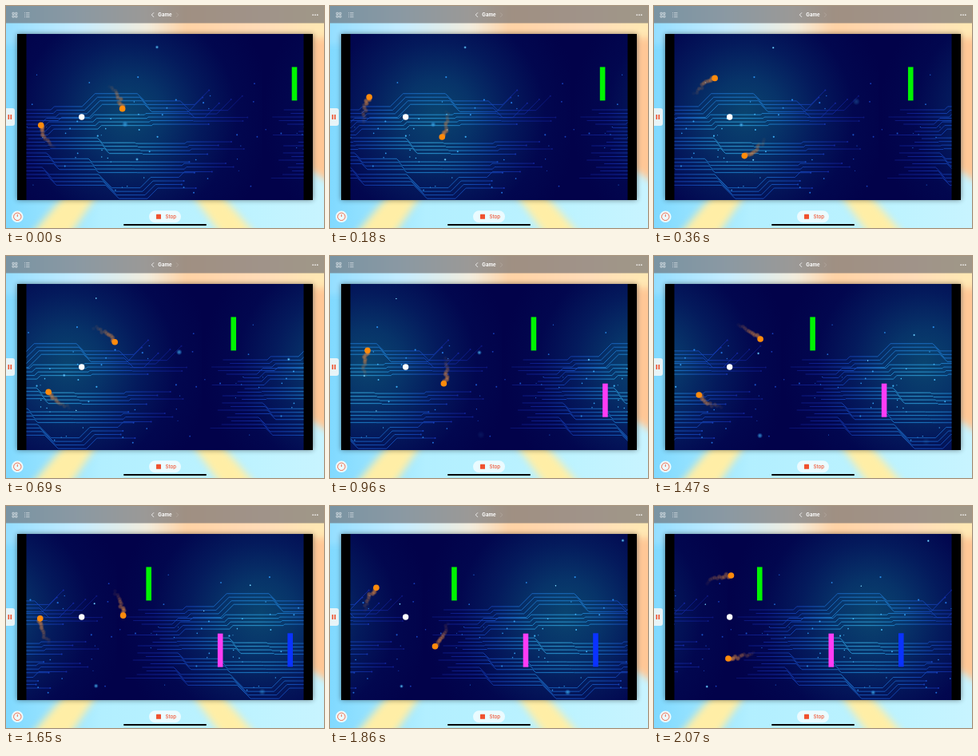
Animation of 398 by 278 pixels, one loop 2.1 s. Source, as an HTML page with a canvas:

```html
<!DOCTYPE html>
<html lang="en">
<head>
<meta charset="utf-8">
<title>Game</title>
<style>
html, body { margin: 0; width: 100%; height: 100%; overflow: hidden; }
body { position: relative; background: linear-gradient(90deg, #80d9ff, #b2efff 30%, #bdf3ff 75%, #c8f4ff); }
svg, canvas { position: absolute; left: 0; top: 0; width: 398px; height: 278px; }
text { font-family: Inter, "Open Sans", sans-serif; }
.screen { filter: drop-shadow(0 0 3px #0007); }
.soft { filter: blur(5px); }
</style>
</head>
<body>
<svg viewBox="0 0 398 278">
  <linearGradient id="sky">
    <stop stop-color="#8adbff"/>
    <stop offset=".25" stop-color="#c4ecff"/>
    <stop offset=".45" stop-color="#f3ecdc"/>
    <stop offset=".56" stop-color="#ffd2a4"/>
    <stop offset=".78" stop-color="#ffdcb8"/>
    <stop offset=".93" stop-color="#ffe8b4"/>
  </linearGradient>
  <g class="soft">
    <path d="M-20-20h440v68H-20z" fill="url(#sky)"/>
    <path d="M380 40h40v190l-40-25z" fill="#ffc796"/>
    <path d="M75 235h40L78 290H28zM232 235h36l48 55h-44z" fill="#ffeea6"/>
  </g>
  <rect width="398" height="21.5" fill="#6b6b6f" opacity=".64"/>
  <g fill="none" stroke="#fff" stroke-width=".7" opacity=".8">
    <path d="M8 8.3h2.2v2.2H8zM11.7 8.3h2.2v2.2h-2.2zM8 12h2.2v2.2H8zM11.7 12h2.2v2.2h-2.2z"/>
    <path d="M23 8.7h1M25 8.7h4.5M23 11.2h1M25 11.2h4.5M23 13.7h1M25 13.7h4.5"/>
    <path d="M185 8.3l-2.7 2.8 2.7 2.8" stroke-width="1"/>
    <path d="M213 8.3l2.7 2.8-2.7 2.8" opacity=".3"/>
    <path d="M384.2 11.2h0M387 11.2h0M389.8 11.2h0" stroke-width="1.8" stroke-linecap="round"/>
  </g>
  <text x="199" y="13.2" font-size="6.1" font-weight="700" fill="#fff" text-anchor="middle">Game</text>

  <rect class="screen" x="14" y="35" width="370" height="208"/>

  <path d="M0 128h8a3 3 0 0 1 3 3v16a3 3 0 0 1-3 3H0z" fill="#f3f6f6" opacity=".9"/>
  <path d="M3.3 136v6M6.3 136v6" stroke="#f0502d" stroke-width="1.6"/>

  <circle cx="14.3" cy="263.8" r="7.3" fill="#fff" opacity=".85"/>
  <g fill="none" stroke="#f0603d" stroke-width=".9">
    <circle cx="14.3" cy="263.8" r="4.7"/>
    <path d="M14.3 261v3"/>
  </g>

  <rect x="179" y="256.3" width="40" height="15" rx="7.5" fill="#fff" opacity=".72"/>
  <rect x="188" y="260.8" width="6" height="6" rx=".5" fill="#f0502d"/>
  <text x="199.5" y="266.1" font-size="6.2" font-weight="500" fill="#f0502d">Stop</text>
  <rect x="147" y="273" width="104" height="2" rx="1"/>
</svg>
<canvas></canvas>
<script>
const LOOP = 2100, STEP = 30, SPEED = 0.1105, TILE = 347;
const canvas = document.querySelector('canvas');
const ctx = canvas.getContext('2d');
const scale = devicePixelRatio || 1;
canvas.width = 398 * scale;
canvas.height = 278 * scale;

const hash = n => { const s = Math.sin(n * 12.9898) * 43758.5453; return s - Math.floor(s); };
const clamp = v => Math.min(1, Math.max(0, v));

function radial(x, y, r, ...colors) {
  const g = ctx.createRadialGradient(x, y, 0, x, y, r);
  colors.forEach((c, i) => g.addColorStop(i / (colors.length - 1), c));
  return g;
}

function disc(x, y, r, fill) {
  ctx.fillStyle = fill;
  ctx.beginPath();
  ctx.arc(x, y, r, 0, 7);
  ctx.fill();
}

// Lanes run in bundles of four that spread towards the middle and close again.
function trace(lane, ink) {
  const bundle = Math.floor(lane / 4), inner = lane % 4;
  let x = 4 + 50 * hash(lane + 5), y = 130 + 4.5 * lane;
  const end = 235 + 95 * hash(lane + 31);
  ctx.beginPath();
  ctx.moveTo(x, y);
  for (let k = 0; k < 4; k++) {
    const seed = hash(bundle * 7 + k + 1);
    const bend = 62 + 58 * k + 22 * seed + 3 * inner;
    if (bend > end - 20) break;
    const spread = (bundle - 2) * 5 + 14 * (seed - 0.5);
    const rise = k < 2 ? spread : -spread;
    ctx.lineTo(Math.max(x, bend), y);
    x = Math.max(x, bend) + Math.abs(rise);
    ctx.lineTo(x, y += rise);
  }
  ctx.lineTo(x = Math.max(x, end), y);
  if (lane < 5) ctx.lineTo(x += 18, y -= 18);
  ctx.stroke();
  disc(x, y, 1, ink);
}

function tile(x) {
  ctx.save();
  ctx.translate(x, 0);
  ctx.fillStyle = radial(180, 136, 180, '#0a446f', '#073369', '#041a5c', '#02074f', '#02024a');
  ctx.fillRect(0, 35, TILE + 1, 208);
  const ink = radial(170, 165, 165, '#40bfee', '#2190dc', '#164fc4', '#1226a0', '#0b1478');
  ctx.strokeStyle = ink;
  ctx.lineWidth = 0.8;
  for (let lane = 0; lane < 20; lane++) trace(lane, ink);
  const glow = radial(170, 165, 170, '#50cfff', '#2484e4', '#163cb8');
  for (let i = 1; i < 55; i++) {
    const y = 165 + 95 * (hash(i + 70) + hash(i + 140) - 1);
    disc(4 + 338 * hash(i), y, 0.5 + 0.6 * hash(i + 210), glow);
  }
  ctx.restore();
}

// Each spark appears large and faint, then sharpens while it shrinks.
function spark(x0, y0, birth, t) {
  const age = (t - birth) / 2200;
  if (age < 0 || age > 1) return;
  const x = x0 - SPEED * t, y = y0 + 0.002 * t, r = 0.8 + 4.4 * (1 - age) ** 1.5;
  ctx.globalAlpha = clamp(age * 5) * 0.85;
  disc(x, y, r, radial(x, y, r, '#48c4ffcc', '#38a8f088', '#2080e000'));
  ctx.globalAlpha = clamp(age * 3 - 0.8);
  disc(x, y, 1.1 - 0.5 * age, '#8fe4ff');
  ctx.globalAlpha = 1;
}

function sparks(t) {
  spark(189, 51.5, -1000, t);
  spark(149, 148, -400, t);
  spark(164, 192, -1100, t);
  spark(293, 119, 200, t);
  spark(430, 128, -400, t);
  spark(488, 96, 100, t);
  spark(295, 222, 900, t);
  spark(503, 229.5, 1400, t);
  spark(572, 39.5, 800, t);
}

function ball(angle, frame, seed) {
  const at = (a, r) => [94.7 + r * Math.cos(a), 139 + r * Math.sin(a)];
  for (let i = 11; i > 0; i--) {
    const n = frame * 2 - i + seed;
    const [x, y] = at(angle - i * 0.057, 52 + 4 * (hash(n) - 0.5));
    const r = 3.8 - i * 0.08;
    ctx.globalAlpha = 0.62 * (1 - i / 12) * (0.6 + 0.6 * hash(n + 9));
    disc(x, y, r, radial(x, y, r, '#f49a48', '#c87a40', '#a0603000'));
  }
  ctx.globalAlpha = 1;
  disc(...at(angle, 52), 3.8, '#ff8b0c');
}

function bar(x, y, color) {
  if (x > 370) return;
  ctx.fillStyle = color;
  ctx.fillRect(x - 3.3, y, 6.6, 42);
}

function draw(now) {
  const frame = Math.floor(now % LOOP / STEP), t = frame * STEP;
  const shift = SPEED * t;
  ctx.setTransform(scale, 0, 0, scale, 0, 0);
  ctx.clearRect(0, 0, 398, 278);
  ctx.save();
  ctx.beginPath();
  ctx.rect(25.5, 35, 347, 208);
  ctx.clip();
  for (let k = 0; k < 2; k++) tile(k * TILE - 26 - shift);
  sparks(t);
  bar(361 - shift, 76.4, '#00f500');
  bar(450.5 - shift, 159.7, '#ff3cf5');
  bar(538 - shift, 159.3, '#0a32ff');
  const angle = (0.2239 * t - 11.5) * Math.PI / 180;
  ball(angle, frame, 300);
  ball(angle + Math.PI, frame, 700);
  disc(94.7, 139, 3.7, '#fff');
  ctx.restore();
}

const start = performance.now();
function tick() {
  draw(performance.now() - start);
  requestAnimationFrame(tick);
}
tick();
</script>
</body>
</html>
```
